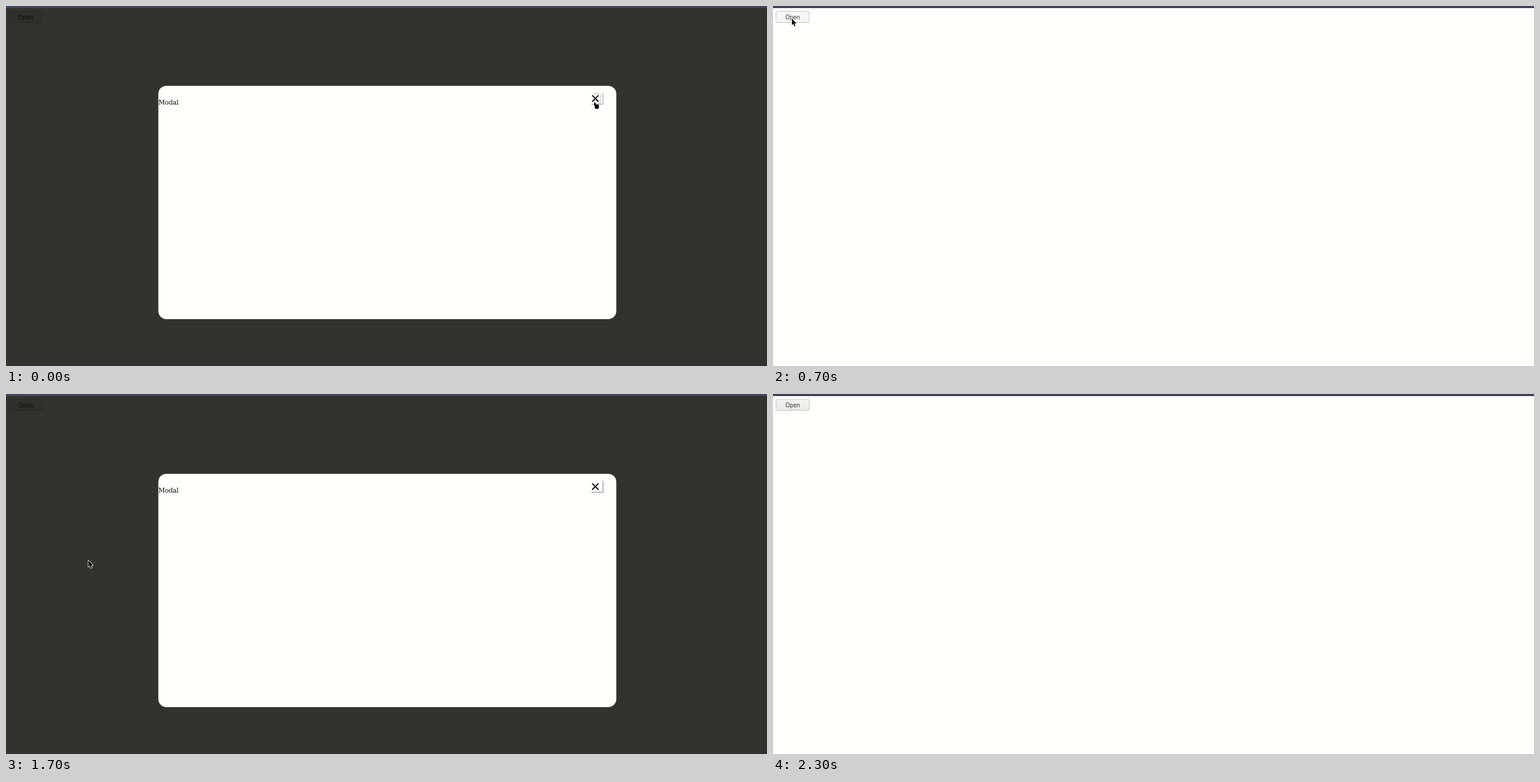
An HTML page with a canvas for the animation above (2600 ms loop, 1088 by 515 pixels).

```html
<!DOCTYPE html>
<html lang="en">
<head>
<meta charset="utf-8">
<title>Modal dialog</title>
<style>
html, body { margin: 0; width: 100%; height: 100%; overflow: hidden; background: #fffffc; }
canvas { display: block; width: 1088px; height: 515px; }
</style>
</head>
<body>
<canvas id="stage" width="1088" height="515"></canvas>
<script>
const ctx = document.getElementById('stage').getContext('2d');
const W = 1088, H = 515, LOOP = 2600, STEP = 100;
const PAPER = '#fffffc', DIM = '#32332e';
const CLOSED = 100, OPENED = 900, DISMISSED = 1800, POINTER_GONE = 2300;

const lerp = (a, b, p) => a + (b - a) * p;
const easeOut = p => 1 - (1 - p) ** 2;

// The pointer glides from one stop to the next and rests in between.
const home = { x: 841, y: 138 };
const glides = [
  { from: 100, to: 300, x: 243, y: 112 },
  { from: 400, to: 700, x: 27, y: 18, ease: easeOut },
  { from: 800, to: 900, x: 26, y: 17 },
  { from: 900, to: 1000, x: 45, y: 42 },
  { from: 1100, to: 1300, x: 304, y: 235 },
  { from: 1500, to: 1700, x: 117.7, y: 238 },
  { from: 1700, to: 1800, x: 105.5, y: 196.5 },
  { from: 1900, to: 2100, x: 27, y: 10 }
];

function pointerAt(t) {
  const now = Math.floor(t / STEP) * STEP;
  let { x, y } = home;
  for (const g of glides) {
    if (now <= g.from) break;
    const p = Math.min(1, (now - g.from) / (g.to - g.from));
    const e = g.ease ? g.ease(p) : p;
    x = lerp(x, g.x, e);
    y = lerp(y, g.y, e);
  }
  return { x, y };
}

function rect(color, x, y, w, h) {
  ctx.fillStyle = color;
  ctx.fillRect(x, y, w, h);
}

function box(fill, x, y, w, h, r) {
  ctx.beginPath();
  ctx.roundRect(x, y, w, h, r);
  ctx.fillStyle = fill;
  ctx.fill();
}

function stroke(color, width) {
  ctx.strokeStyle = color;
  ctx.lineWidth = width;
  ctx.stroke();
}

function label(text, x, y, font, color, align) {
  ctx.font = font;
  ctx.fillStyle = color;
  ctx.textAlign = align;
  ctx.fillText(text, x, y);
}

function drawArrow({ x, y }) {
  const shape = new Path2D('M0 0V9.2L2.1 7.4L3.7 11L5.1 10.4L3.6 6.9L6.6 6.7Z');
  ctx.save();
  ctx.translate(x, y);
  ctx.lineJoin = 'round';
  ctx.strokeStyle = 'rgba(255,255,255,.85)';
  ctx.lineWidth = 1.6;
  ctx.stroke(shape);
  ctx.fillStyle = '#000';
  ctx.fill(shape);
  ctx.restore();
}

function drawHand({ x, y }) {
  box('#000', x, y, 2, 5, 1);
  box('#000', x + 0.8, y + 3, 5.8, 6, 1.5);
}

function drawPage(hover) {
  rect(PAPER, 0, 0, W, H);
  const shade = ctx.createLinearGradient(0, 8, 0, 24);
  shade.addColorStop(0, hover ? '#faf9f8' : '#f5f4f2');
  shade.addColorStop(1, hover ? '#f5f4f2' : '#e8e7e4');
  box(shade, 4.3, 7.8, 47.6, 15.8, 2);
  stroke('#c6c4c0', 0.9);
  label('Open', 28.1, 18.8, '8.1px "Noto Sans", sans-serif', '#2e3436', 'center');
}

function drawClose(pressed) {
  const edge = pressed ? '#aaaaa7' : '#939390';
  rect(edge, 853, 124, 1, 17);
  rect(edge, 837, 140, 17, 1);
  if (pressed) {
    ctx.setLineDash([1, 0.7]);
    ctx.beginPath();
    ctx.rect(841.4, 125.2, 8.2, 14.3);
    stroke('#85857f', 0.7);
    ctx.setLineDash([]);
  }
  const cx = 842.6, cy = 132.3, r = 4.6;
  ctx.beginPath();
  for (const side of [-1, 1]) {
    ctx.moveTo(cx - r, cy - r * side);
    ctx.lineTo(cx + r, cy + r * side);
  }
  stroke('#000', 1.6);
}

function drawModal(pressed) {
  ctx.globalCompositeOperation = 'multiply';
  rect(DIM, 0, 0, W, H);
  ctx.globalCompositeOperation = 'source-over';
  box(PAPER, 217.8, 114.2, 654.7, 333.7, 11.5);
  label('Modal', 217.9, 141, '9.07px "DejaVu Serif", serif', '#000', 'left');
  drawClose(pressed);
}

function draw(t) {
  const pressed = t < CLOSED;
  const modal = pressed || (t >= OPENED && t < DISMISSED);
  const pointerOn = t < POINTER_GONE;
  const pointer = pointerAt(t);
  const hover = pointerOn && pointer.x < 52 && pointer.y < 24;

  drawPage(hover);
  if (modal) drawModal(pressed);
  rect(modal ? '#44465e' : '#414056', 0, 0, W, 3);
  if (pointerOn) (pressed ? drawHand : drawArrow)(pointer);
}

const start = performance.now();
function tick() {
  draw((performance.now() - start) % LOOP);
  requestAnimationFrame(tick);
}
tick();
</script>
</body>
</html>
```
